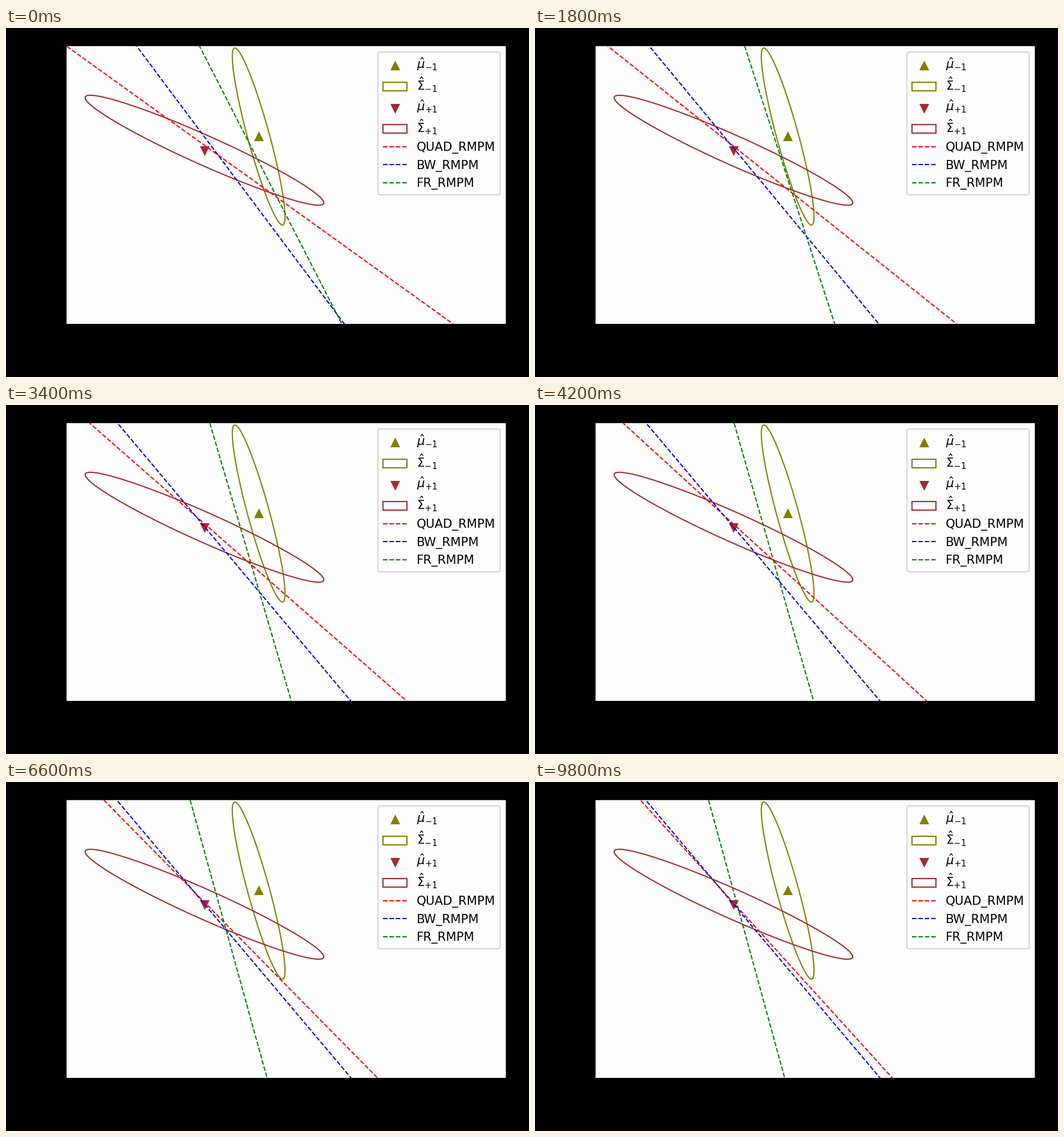
Recreate the animation shown at these times as a matplotlib script. Size 917x611 px, loop 10000 ms.

```python
import numpy as np
import matplotlib.pyplot as plt
from matplotlib.animation import FuncAnimation
from matplotlib.patches import FancyBboxPatch, Polygon, Rectangle

W, H, DPI = 917, 611, 152.75
FRAMES, STEP = 50, 200
LEFT, RIGHT, TOP, BOTTOM = 106.2, 876.4, 31.7, 518
Y_HI, Y_LO = 32, 517.5          # heights at which the line positions are given
EM = 10 * DPI / 72

plt.rcParams["font.family"] = "DejaVu Sans"
fig = plt.figure(figsize=((W + 0.001) / DPI, H / DPI), dpi=DPI, facecolor="black")
ax = fig.add_axes([LEFT / W, 1 - BOTTOM / H, (RIGHT - LEFT) / W, (BOTTOM - TOP) / H])
ax.set(xlim=(LEFT, RIGHT), ylim=(BOTTOM, TOP), xticks=[], yticks=[])
ax.spines[:].set_visible(False)
ax.patch.set(facecolor="#fefefe", snap=False)


def mean(x, y, color, marker, z=2):
    ax.plot(x, y, marker, color=color, ms=6, mew=1.5, zorder=z)


def covariance(cx, cy, rx, ry, rho, color):
    """Ellipse with half extents rx, ry and correlation rho."""
    t = np.linspace(0, 2 * np.pi, 400, endpoint=False)
    pts = np.column_stack([cx + rx * np.cos(t),
                           cy + ry * np.cos(t - np.arccos(rho))])
    ax.add_patch(Polygon(pts, closed=True, fill=False, edgecolor=color, lw=1))


def boundary(color, x=(), y=(), z=2):
    line, = ax.plot(x, y, "--", color=color, lw=1, zorder=z)
    return line


def legend():
    x0, x1, y0, y1 = 652.2, 866.5, 42, 292
    ax.add_patch(FancyBboxPatch(
        (x0, y0), x1 - x0, y1 - y0, facecolor="#fefefe", edgecolor="0.8", lw=1,
        boxstyle=f"round,pad=0,rounding_size={0.2 * EM}", alpha=0.8, zorder=5))
    hx = x0 + 0.4 * EM           # handles are two ems wide

    def label(base, text):
        ax.text(hx + 2.8 * EM, base, text, fontsize=10, va="baseline", zorder=6)

    for base, color, marker, sign in [(71.1, "olive", "^", "-"),
                                      (145.1, "brown", "v", "+")]:
        mean(hx + EM, base - 0.263 * EM, color, marker, 6)
        label(base, rf"$\hat{{\mu}}_{{{sign}1}}$")
        base += 38.5
        ax.add_patch(Rectangle((hx, base - 0.7 * EM), 2 * EM, 0.7 * EM, fill=False,
                               edgecolor=color, lw=1, zorder=6))
        label(base, rf"$\hat{{\Sigma}}_{{{sign}1}}$")

    names = [("red", "QUAD_RMPM"), ("blue", "BW_RMPM"), ("green", "FR_RMPM")]
    for k, (color, name) in enumerate(names):
        base = 215.4 + 31.5 * k
        boundary(color, [hx, hx + 2 * EM], [base - 0.35 * EM] * 2, 6)
        label(base, name)


mean(443, 190, "olive", "^")
covariance(443, 190, 46.2, 155, 0.903, "olive")
mean(348, 214, "brown", "v")
covariance(348, 214, 209.2, 96.2, 0.956, "brown")
quad, bw, fr = boundary("red"), boundary("blue"), boundary("green")
legend()
ax.set(xlim=(LEFT, RIGHT), ylim=(BOTTOM, TOP))

KEYS = [0, 1.8, 3.4, 5, 6.6, 8.2, 9.8]


def smooth(values):
    return np.poly1d(np.polyfit(KEYS, values, 5))


quad_hi = smooth([106.5, 128, 147, 161.5, 172, 179.7, 185])
quad_lo = smooth([783, 738.5, 702, 672, 651, 636, 626])
fr_mid = smooth([464, 446.5, 428.8, 408.5, 390.3, 378, 371])


def place(line, hi, lo):
    """Run the line through (hi, Y_HI) and (lo, Y_LO), across the whole figure."""
    y = np.array([-0.5, H + 0.5])
    line.set_data(hi + (lo - hi) * (y - Y_HI) / (Y_LO - Y_HI), y)


def draw(i):
    t = i * STEP / 1000
    place(quad, quad_hi(t), quad_lo(t))
    settle = np.exp(-0.95 * t)
    place(bw, 194.4 + 34.8 * settle, 604.5 - 11.8 * settle)
    spread = 133 + 50 * np.exp(-2.2 * t) + 66 * np.exp(-0.57 * t)
    place(fr, fr_mid(t) - spread / 2, fr_mid(t) + spread / 2)
    return quad, bw, fr


anim = FuncAnimation(fig, draw, frames=FRAMES, init_func=lambda: draw(0),
                     interval=STEP, repeat=True, repeat_delay=0, blit=False)
plt.show()
```
